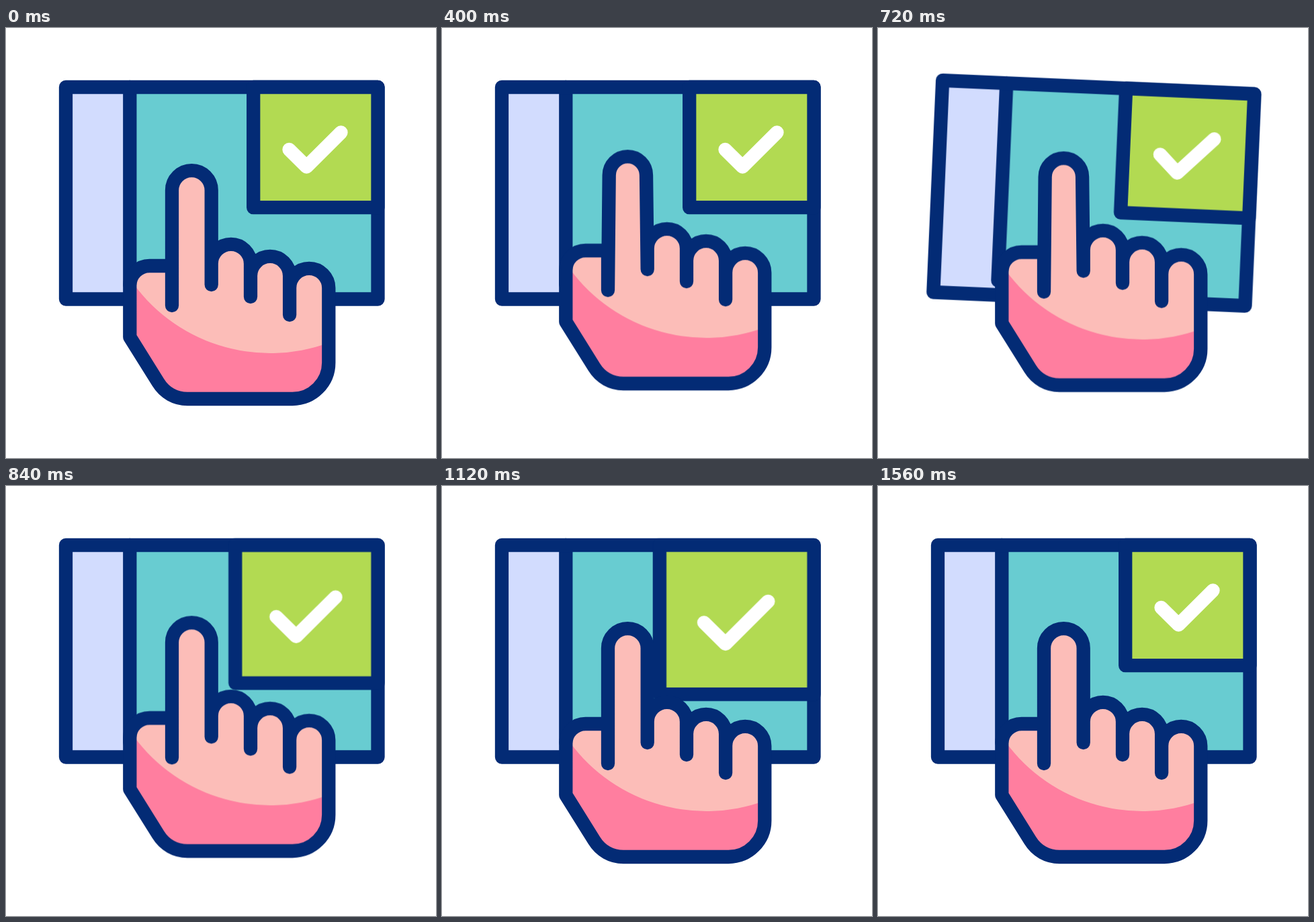
These frames come from a looping animation (640 px wide and 640 px high, 1760 ms). An HTML page:

```html
<!DOCTYPE html>
<html lang="en">
<head>
<meta charset="utf-8">
<title>Tap to confirm</title>
<style>
  html, body { margin: 0; width: 100%; height: 100%; overflow: hidden; background: #fff; }
  svg { display: block; width: 100vw; height: 100vh; }

  .line {
    stroke: #032b75;
    stroke-width: 20.3;
    stroke-linecap: round;
    stroke-linejoin: round;
    vector-effect: non-scaling-stroke;
  }
  .tick { stroke: #fff; fill: none; }

  .card, .badge, .hand, .palm {
    animation: 1760ms cubic-bezier(.333, 0, .667, 1) infinite;
  }
  .card { transform-origin: 321px 246px; animation-name: tilt; }
  .badge { transform-origin: 553.5px 88px; animation-name: grow; }
  .hand { animation-name: lift; }
  .palm { animation-name: squeeze; }

  @keyframes lift {
    0%, 2.273% { transform: translateY(0); }
    31.818% { transform: translateY(-29.3px); }
    56.818%, 100% { transform: translateY(0); }
  }
  @keyframes tilt {
    0%, 31.818% { transform: rotate(0deg); }
    38.636% { transform: rotate(3deg); }
    47.727%, 100% { transform: rotate(0deg); }
  }
  @keyframes grow {
    0%, 36.364% { transform: scale(1); }
    56.818% { transform: scale(1.248); animation-timing-function: cubic-bezier(.78, 0, .2, 1); }
    88.636%, 100% { transform: scale(1); }
  }
  /* The index finger narrows at its tip while the hand is up. */
  @keyframes squeeze {
    0%, 18.182%, 45.455%, 100% {
      d: path("M184.3 460V383.3A29.3 29.3 0 0 1 213.6 354H247V413L247 241.5A29.35 29.35 0 0 1 305.7 241.5L305.7 382V351A29.15 29.15 0 0 1 364 351V400V369A29.05 29.05 0 0 1 422.1 369V427V387A29.1 29.1 0 0 1 480.3 387V498A54 54 0 0 1 426.3 552H270C252 552 236 543 226.5 527.5Z");
    }
    31.818% {
      d: path("M184.3 460V383.3A29.3 29.3 0 0 1 213.6 354H247V413L253.4 242.7A22.95 22.95 0 0 1 299.3 242.7L305.7 382V351A29.15 29.15 0 0 1 364 351V400V369A29.05 29.05 0 0 1 422.1 369V427V387A29.1 29.1 0 0 1 480.3 387V498A54 54 0 0 1 426.3 552H270C252 552 236 543 226.5 527.5Z");
    }
  }
</style>
</head>
<body>
<svg viewBox="0 0 640 640">
  <g class="card">
    <rect x="89" y="88" width="464.5" height="315.5" fill="#d2dcfe"/>
    <rect x="184.3" y="88" width="369.2" height="315.5" fill="#68ccd1"/>
    <path class="line" d="M184.3 88V382" fill="none"/>
    <rect class="line" x="89" y="88" width="464.5" height="315.5" fill="none"/>
    <g class="badge">
      <rect class="line" x="368.2" y="88" width="185.3" height="179.2" fill="#b2da52"/>
      <path class="line tick" d="M421.5 181L447.3 206.5L498.5 155.5"/>
    </g>
  </g>
  <g class="hand">
    <path class="palm" fill="#fcbdb8"/>
    <path fill="#ff7e9f" d="M184.3 373A252 252 0 0 0 480.3 468.5V498A54 54 0 0 1 426.3 552H270C252 552 236 543 226.5 527.5L184.3 460Z"/>
    <path class="palm line" fill="none"/>
  </g>
</svg>
</body>
</html>
```
